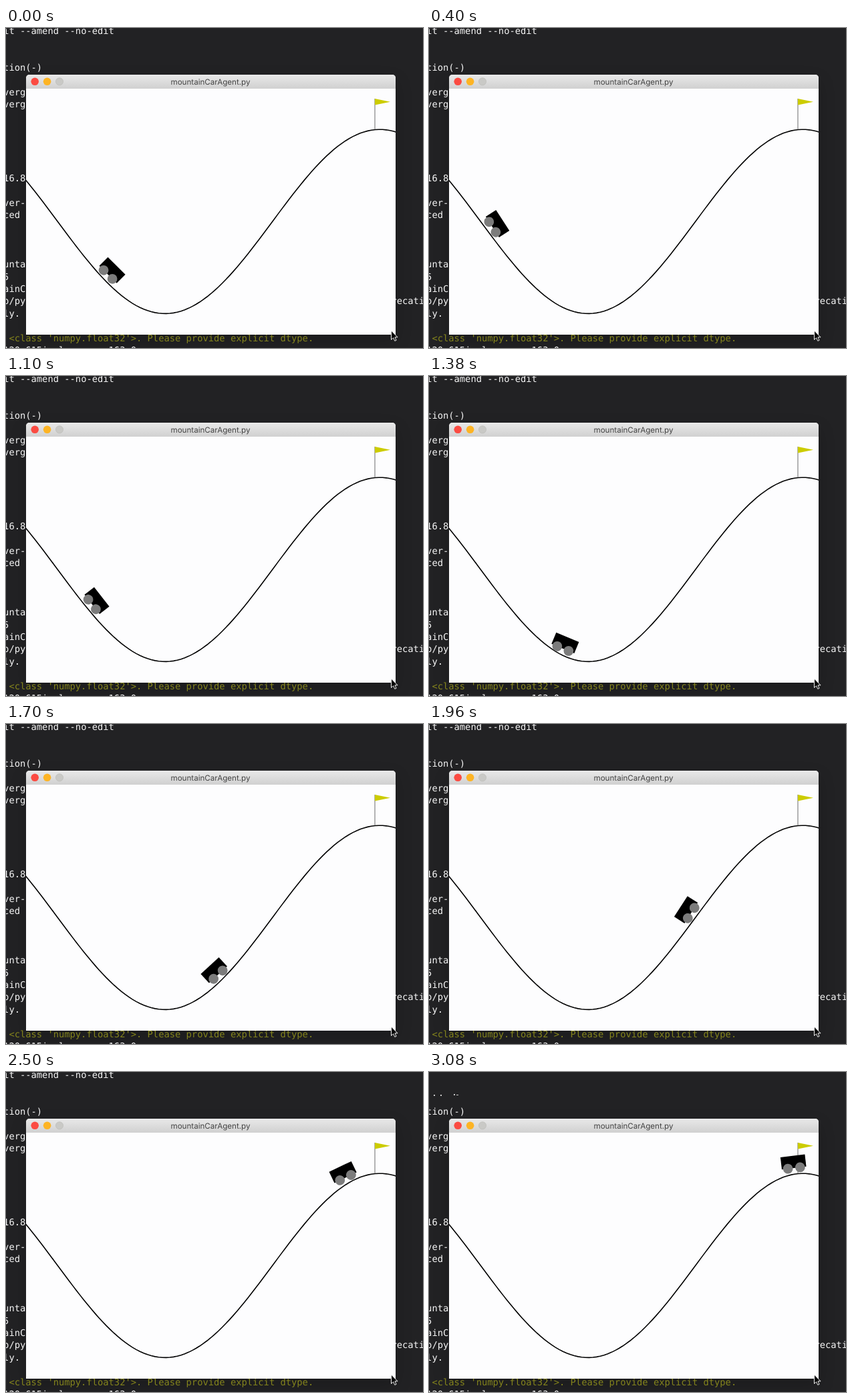
An HTML page for the animation above (3.1 s loop, 624x480 px).

```html
<!DOCTYPE html>
<html lang="en">
<head>
<meta charset="utf-8">
<title>Mountain car</title>
<style>
  html, body { margin: 0; width: 100%; height: 100%; overflow: hidden; background: #222224; }
  svg { display: block; position: absolute; left: 0; top: 0; }
  text { text-rendering: geometricPrecision; white-space: pre; }
  #terminal text { font: 13.77px "DejaVu Sans Mono", monospace; fill: #f6f6f6; }
  #terminal .dim { fill: #84841c; }
  #title { font: 11.6px Inter, sans-serif; fill: #444; text-anchor: middle; }
</style>
</head>
<body>
<svg width="624" height="480" viewBox="0 0 624 480">
  <defs>
    <linearGradient id="bar" x1="0" y1="0" x2="0" y2="1">
      <stop offset="0" stop-color="#e9e9e9"/>
      <stop offset="1" stop-color="#d0d0d0"/>
    </linearGradient>
    <filter id="blur" x="-20%" y="-20%" width="140%" height="140%">
      <feGaussianBlur stdDeviation="12"/>
    </filter>
    <clipPath id="view"><rect x="30" y="91" width="553" height="369"/></clipPath>
  </defs>

  <rect width="624" height="480" fill="#222224"/>
  <rect x="30" y="80" width="553" height="390" fill="#000" opacity=".2" filter="url(#blur)"/>
  <g id="terminal"></g>
  <g id="scraps" fill="#c8c8c8" visibility="hidden">
    <rect x="7" y="34" width="2" height="2"/>
    <rect x="17" y="34" width="2" height="2"/>
    <rect x="37" y="33" width="2" height="2"/>
    <rect x="41" y="34" width="3" height="1"/>
  </g>

  <path d="M30 460V75a5 5 0 0 1 5-5H578a5 5 0 0 1 5 5V460Z" fill="#fdfdfe"/>
  <path d="M30 91V75a5 5 0 0 1 5-5H578a5 5 0 0 1 5 5V91Z" fill="url(#bar)"/>
  <circle cx="43.2" cy="80.3" r="5.8" fill="#fb4b42"/>
  <circle cx="61.6" cy="80.3" r="5.8" fill="#fdb424"/>
  <circle cx="80" cy="80.3" r="5.6" fill="#c9c9c6" stroke="#b9b9b5" stroke-width=".6"/>
  <text id="title" x="306" y="85">mountainCarAgent.py</text>

  <g clip-path="url(#view)">
    <path id="track" fill="none" stroke="#000" stroke-width="1.6"/>
    <path d="M552 152V106" stroke="#777" stroke-width="1.1"/>
    <path d="M552 106V115.5L575 110.8Z" fill="#cccc00"/>
    <g id="car">
      <rect x="-18.4" y="-27.6" width="36.8" height="18.4"/>
      <g fill="#7c7c7c">
        <circle cx="-9.2" cy="-9.2" r="7.4"/>
        <circle cx="9.2" cy="-9.2" r="7.4"/>
      </g>
    </g>
  </g>
  <path d="M576.5 454V467.5L579.6 464.7L581.8 469.4L584 468.4L581.9 463.8H586Z"
        fill="#000" stroke="#f4f4f4" stroke-width="1"/>
</svg>
<script>
  const $ = id => document.getElementById(id);
  const LOOP = 3100, CELL = 8.29, LEFT = -3.9, ROW = 18.44;
  const SCALE = 306.9, X0 = 30.4, FLOOR = 459.1, MIN = -1.2, MAX = 0.6;

  // row, column, text
  const lines = [
    [0, 0, 'it --amend --no-edit'],
    [3, 0, 'tion(-)'],
    [5, 0, 'verg'],
    [6, 0, 'verg'],
    [12, 0, '16.8'],
    [14, 0, 'ver-'],
    [15, 0, 'ced'],
    [19, 0, 'unta'],
    [20, 0, '5'],
    [21, 0, 'ainC'],
    [22, 0, 'b/py'],
    [22, 70, 'recati'],
    [23, 0, 'ly.'],
    [25, 1, "<class 'numpy.float32'>. Please provide explicit dtype.", 'dim'],
    [26, 0, '120.615ipelosses  -163.0']
  ];
  const rows = lines.map(([row, col, str, cls]) => {
    const el = document.createElementNS('http://www.w3.org/2000/svg', 'text');
    el.setAttribute('x', LEFT + col * CELL);
    el.setAttribute('y', 8.7 + row * ROW);
    if (cls) el.setAttribute('class', cls);
    el.textContent = str;
    $('terminal').append(el);
    return el;
  });

  const px = p => X0 + (p - MIN) * SCALE;
  const py = p => FLOOR - (Math.sin(3 * p) * 0.45 + 0.55) * SCALE;

  const points = Array.from({ length: 101 }, (_, i) => {
    const p = MIN - 0.01 + (MAX - MIN + 0.02) * i / 100;
    return px(p).toFixed(2) + ' ' + py(p).toFixed(2);
  });
  $('track').setAttribute('d', 'M' + points.join('L'));

  // step, position, velocity per step
  const keys = [
    [0, -0.823, -0.0332],
    [13.7, -1.057, 0],
    [17, -1.0376, 0.0118],
    [29, -0.6577, 0.0488],
    [37, -0.2446, 0.0528],
    [47, 0.2037, 0.033],
    [53, 0.3693, 0.0236],
    [58.4, 0.4844, 0.0198]
  ];

  function position(step) {
    const last = keys[keys.length - 1];
    if (step >= last[0]) return last[1];
    const i = keys.findIndex(k => k[0] > step);
    const [a, p, v] = keys[i - 1], [b, q, w] = keys[i];
    const d = b - a, s = (step - a) / d, r = 1 - s;
    return r * r * ((1 + 2 * s) * p + s * d * v) + s * s * ((3 - 2 * s) * q - r * d * w);
  }

  // Steps come in threes, lasting 20, 20 and 100 ms.
  function stepAt(t) {
    const u = t + 20, rest = u % 140;
    return 3 * Math.floor(u / 140) + (rest >= 40 ? 2 : rest >= 20 ? 1 : 0) - 1;
  }

  function draw(t) {
    const p = position(stepAt(t));
    const tilt = -Math.cos(3 * p) * 180 / Math.PI;
    $('car').setAttribute('transform', `translate(${px(p)} ${py(p)}) rotate(${tilt})`);
    const done = t >= 2940;
    rows[0].setAttribute('visibility', done ? 'hidden' : 'visible');
    $('scraps').setAttribute('visibility', done ? 'visible' : 'hidden');
  }

  const start = performance.now();
  function tick() {
    draw((performance.now() - start) % LOOP);
    requestAnimationFrame(tick);
  }
  tick();
</script>
</body>
</html>
```
